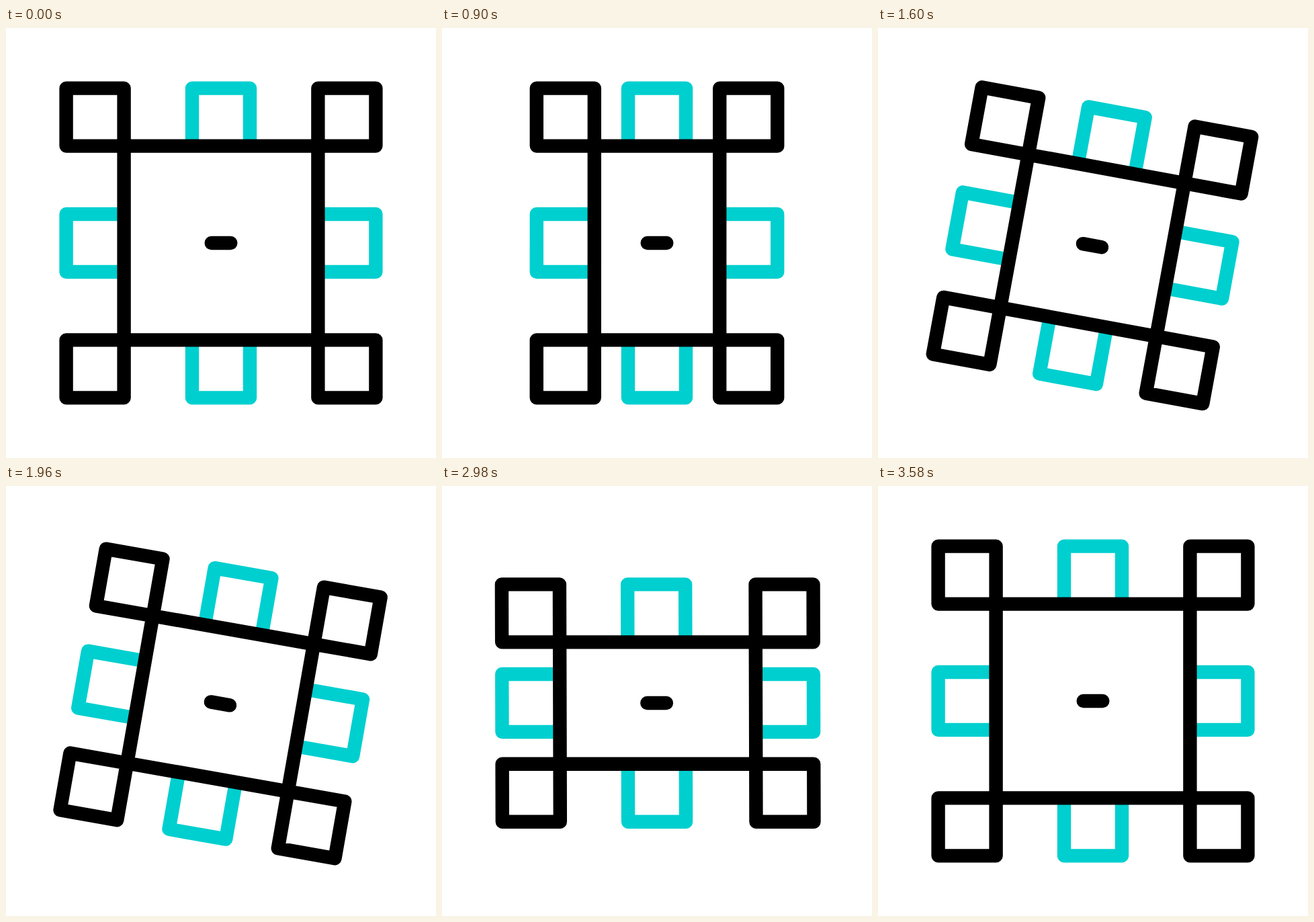
These frames come from a looping animation (640 by 640 pixels, 3.6 s). An HTML page:

```html
<!DOCTYPE html>
<html lang="en">
<head>
<meta charset="utf-8">
<title>Resizing frame</title>
<style>
  html, body { margin: 0; width: 100%; height: 100%; overflow: hidden; background: #fff; }
  svg { display: block; width: 100vw; height: 100vh; }
  path { fill: none; stroke: #000; stroke-width: 20.4; stroke-linejoin: round; }
  #sides { stroke: #00cfcf; }
  #dash { stroke-linecap: round; }
</style>
</head>
<body>
<svg viewBox="0 0 640 640">
  <g id="shape">
    <path id="sides"/>
    <path id="frame"/>
    <path id="dash" d="M-14.3 0H14.3"/>
  </g>
</svg>
<script>
const LOOP = 3600, SIDE = 86, HALF = SIDE / 2;

// w, h: half size of the inner frame; lean: its offset from the dash
const square = { w: 144.4, h: 144.4, angle: 0, x: 320, y: 320, lean: 0, skew: 0 };
const narrow = { ...square, w: 93.2 };
const tilted = { ...square, w: 119.3, h: 114.5, angle: 10.9, x: 318.9, y: 323.9 };
const flat = { ...square, w: 146.2, h: 76.8, x: 319.5, y: 323.8, lean: 2, skew: 0.19 };

const steps = [
  { from: square, to: narrow, start: 0, end: 880 },
  { from: narrow, to: tilted, start: 880, end: 1750 },
  { from: tilted, to: flat, start: 1750, end: 2680 },
  { from: flat, to: square, start: 2680, end: 3580 }
];

const el = id => document.getElementById(id);
const shape = el("shape"), sides = el("sides"), frame = el("frame");

// cubic-bezier(.5, 0, .5, 1), solved by bisection
function ease(x) {
  let lo = 0, hi = 1;
  for (let i = 0; i < 30; i++) {
    const s = (lo + hi) / 2;
    if (1.5 * s - 1.5 * s * s + s * s * s < x) lo = s; else hi = s;
  }
  return lo * lo * (3 - 2 * lo);
}

function pose(t) {
  const { from, to, start, end } = steps.find(s => t < s.end) || steps[steps.length - 1];
  const e = ease(Math.min(1, (t - start) / (end - start)));
  const p = {};
  for (const k in from) p[k] = from[k] + (to[k] - from[k]) * e;
  return p;
}

const box = (x, y, w, h) => `M${x} ${y}h${w}v${h}h${-w}z`;

function draw(t) {
  const { w, h, angle, x, y, lean, skew } = pose(t);
  let tabs = "", boxes = box(lean - w, -h, 2 * w, 2 * h);
  for (const i of [-1, 1]) {
    const edge = lean + i * w, out = i * SIDE;
    tabs += `M${-HALF} ${i * h}v${out}h${SIDE}v${-out}`;
    tabs += `M${edge} ${-HALF}h${out}v${SIDE}h${-out}`;
    for (const j of [-1, 1]) boxes += box(edge, j * h, out, j * SIDE);
  }
  shape.setAttribute("transform", `translate(${x} ${y}) rotate(${angle}) skewX(${skew})`);
  sides.setAttribute("d", tabs);
  frame.setAttribute("d", boxes);
}

const began = performance.now();
function tick() {
  draw((performance.now() - began) % LOOP);
  requestAnimationFrame(tick);
}
tick();
</script>
</body>
</html>
```
